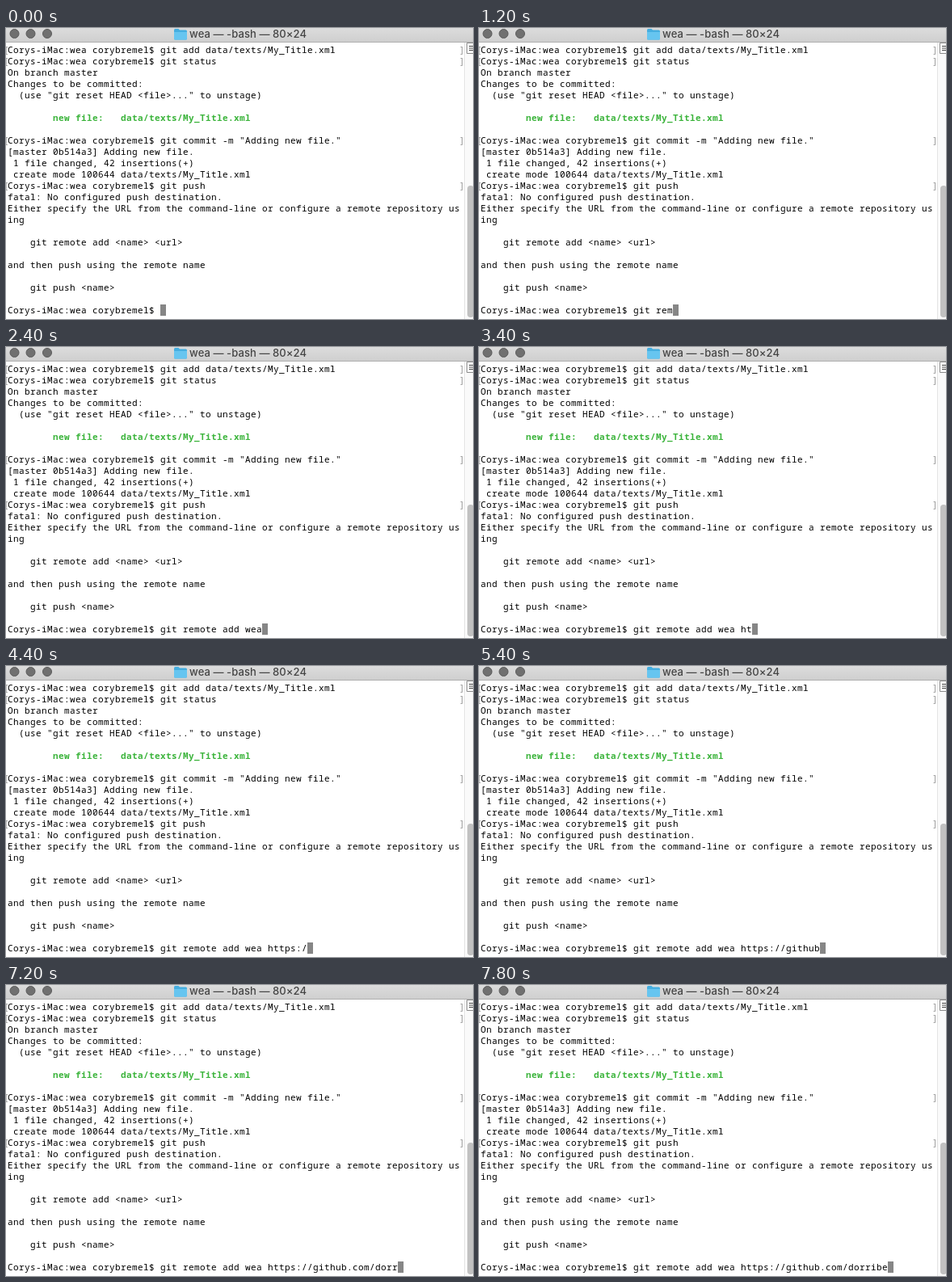
An HTML page that plays this animation: 578x360 px, repeating every 8000 ms.

```html
<!DOCTYPE html>
<html lang="en">
<head>
<meta charset="utf-8">
<title>Terminal</title>
<style>
  html, body { margin: 0; width: 100%; height: 100%; overflow: hidden; background: #fff; }
  .stage { position: relative; width: 578px; height: 360px; overflow: hidden; background: #fff; }

  .bar {
    position: absolute; inset: 0 0 auto; height: 17px;
    background: linear-gradient(#dcdcdc, #cfcfcf); border-bottom: 1px solid #b0b0b0;
  }
  .bar svg { position: absolute; left: 0; top: 0; }
  .bar b {
    position: absolute; left: 227px; top: -1px; white-space: pre;
    font: 500 13px/16px Inter, sans-serif; letter-spacing: .08px; color: #444;
  }

  .screen {
    position: absolute; left: 2px; top: 20px; margin: 0; color: #000;
    font: 500 11px/14px "Noto Sans Mono", monospace;
    letter-spacing: calc(7px - 1ch); white-space: pre;
  }
  .row { position: relative; display: flex; height: 14px; }
  .mark::before, .mark::after { position: absolute; top: 0; font-weight: 400; color: #999; }
  .mark::before { content: "["; left: -5px; }
  .mark::after { content: "]"; left: 559px; }
  .new { color: #3cb43c; font-weight: 600; }

  .typed { flex: none; overflow: hidden; width: 0; animation: type 8s step-end infinite; }
  .caret { flex: none; width: 7px; height: 14px; background: #868686; }

  @keyframes type {
    0% { width: 0 }
    7.5% { width: 7px }
    10% { width: 21px }
    12.5% { width: 35px }
    15% { width: 49px }
    17.5% { width: 63px }
    20% { width: 77px }
    22.5% { width: 84px }
    25% { width: 98px }
    27.5% { width: 112px }
    30% { width: 126px }
    35% { width: 133px }
    42.5% { width: 147px }
    45% { width: 161px }
    47.5% { width: 168px }
    50% { width: 175px }
    55% { width: 182px }
    57.5% { width: 189px }
    60% { width: 203px }
    62.5% { width: 210px }
    65% { width: 224px }
    67.5% { width: 231px }
    70% { width: 245px }
    72.5% { width: 259px }
    77.5% { width: 273px }
    82.5% { width: 266px }
    85% { width: 273px }
    87.5% { width: 280px }
    90% { width: 294px }
    92.5% { width: 301px }
    95% { width: 308px }
    97.5%, 100% { width: 315px }
  }

  .scroll {
    position: absolute; left: 567px; top: 18px; width: 10px; bottom: 0;
    background: #fafafa; border-left: 1px solid #e4e4e4;
  }
  .thumb {
    position: absolute; left: 3px; top: 177px; width: 8px; height: 163px;
    border-radius: 4px; background: #c1c1c1;
  }
  .split { position: absolute; left: 569px; top: 18px; }
</style>
</head>
<body>
<div class="stage">
  <div class="bar">
    <svg width="578" height="17">
      <g fill="#707070" stroke="#5c5c5c">
        <circle cx="10.500" cy="7" r="5.500"/>
        <circle cx="30.500" cy="7" r="5.500"/>
        <circle cx="51" cy="7" r="5.500"/>
      </g>
      <path d="M208 2.500q0-1.500 1.500-1.500h4l1.500 1.500h7.500q1.500 0 1.500 1.500v9q0 1.500-1.500 1.500h-13q-1.500 0-1.500-1.500z" fill="#45aee0"/>
      <path d="M208 5h16v8q0 1.500-1.500 1.500h-13q-1.500 0-1.500-1.500z" fill="#66c5f0"/>
    </svg>
    <b>wea — -bash — 80×24</b>
  </div>

  <div class="screen" id="screen"></div>

  <div class="scroll"><div class="thumb"></div></div>
  <svg class="split" width="9" height="15">
    <path d="M10 .5H1.500v13H10" fill="#fff" stroke="#8a8a8a"/>
    <path d="M4 4.500h5M4 7h5M4 9.500h5" stroke="#444"/>
  </svg>
</div>
<script>
  const prompt = "Corys-iMac:wea corybremel$ ";
  const command = "git remote add wea https://github.com/dorribe";
  const lines = [
    "$git add data/texts/My_Title.xml",
    "$git status",
    "On branch master",
    "Changes to be committed:",
    '  (use "git reset HEAD <file>..." to unstage)',
    "",
    "+        new file:   data/texts/My_Title.xml",
    "",
    '$git commit -m "Adding new file."',
    "[master 0b514a3] Adding new file.",
    " 1 file changed, 42 insertions(+)",
    " create mode 100644 data/texts/My_Title.xml",
    "$git push",
    "fatal: No configured push destination.",
    "Either specify the URL from the command-line or configure a remote repository us",
    "ing",
    "",
    "    git remote add <name> <url>",
    "",
    "and then push using the remote name",
    "",
    "    git push <name>",
    ""
  ];

  const screen = document.getElementById("screen");

  function add(parent, cls, text = "") {
    const el = document.createElement("div");
    el.className = cls;
    el.textContent = text;
    return parent.appendChild(el);
  }

  for (const line of lines) {
    if (line[0] === "$") add(screen, "row mark", prompt + line.slice(1));
    else if (line[0] === "+") add(screen, "row new", line.slice(1));
    else add(screen, "row", line);
  }

  const last = add(screen, "row");
  add(last, "", prompt);
  add(last, "typed", command);
  add(last, "caret");
</script>
</body>
</html>
```
